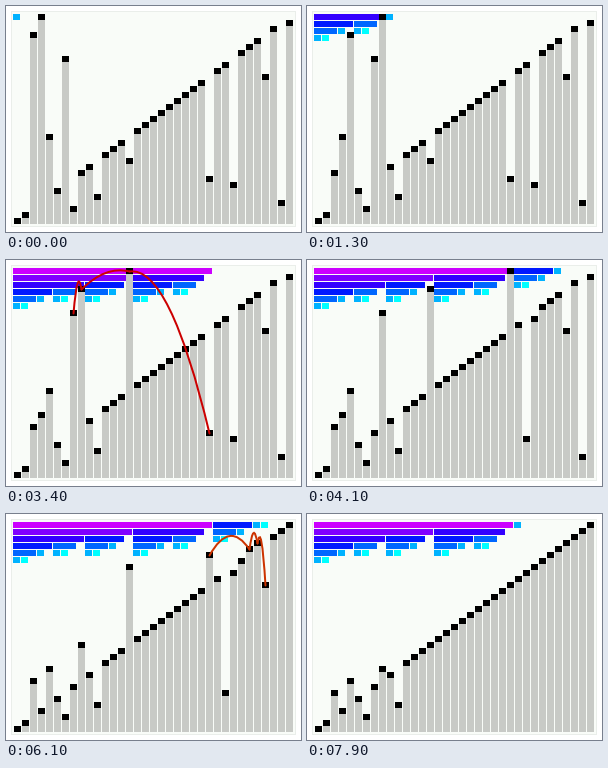
Write a matplotlib script that moves like this. It is 295x226 px and loops after 8000 ms.

```python
import colorsys

import matplotlib.pyplot as plt
from matplotlib.animation import FuncAnimation
from matplotlib.patches import PathPatch, Rectangle
from matplotlib.path import Path

W, H, DPI = 295, 226, 64
FRAMES, STEP_MS = 80, 100
LEONARDO = [1, 1, 3, 5, 9, 15, 25]
ORDER_COLORS = [colorsys.hsv_to_rgb(0.5 + 0.05 * k, 1, 1) for k in range(7)]
SIFT, TRINKLE = "#cc0000", "#cc3300"
BAR, PANEL, EDGE = "#c8cac6", "#f9fcf8", "#eaeeea"

START = [0, 1, 31, 34, 14, 5, 27, 2, 8, 9, 4, 11, 12, 13, 10, *range(15, 24),
         7, 25, 26, 6, 28, 29, 30, 24, 32, 3, 33]


def children(root, order):
    """Roots and orders of the two subtrees below a heap root."""
    if order < 2:
        return []
    return [(root - 1 - LEONARDO[order - 2], order - 1), (root - 1, order - 2)]


def trinkle(values, heaps, i, use_previous=True):
    """Hops (from, to, color) that the root of heap i has to make."""
    ends, total = [], -1
    for order in heaps:
        total += LEONARDO[order]
        ends.append(total)
    root, order = ends[i], heaps[i]
    x, hops = values[root], []
    while use_previous and i > 0:
        prev = ends[i - 1]
        if values[prev] <= max([x] + [values[c] for c, _ in children(root, order)]):
            break
        hops.append((root, prev, TRINKLE))
        i -= 1
        root, order = prev, heaps[i]
    while order > 1:
        child, child_order = max(children(root, order), key=lambda c: values[c[0]])
        if values[child] <= x:
            break
        hops.append((root, child, SIFT))
        root, order = child, child_order
    return hops


def grow(heaps):
    if len(heaps) > 1 and heaps[-2] == heaps[-1] + 1:
        return heaps[:-2] + [heaps[-2] + 1]
    return heaps + [0 if heaps and heaps[-1] == 1 else 1]


def smoothsort(values):
    """List of (values, heaps, hops), one entry per animation step."""
    values, steps, heaps, final = list(values), [], [], []
    for _ in values:
        final = grow(final)

    def show(hops=()):
        steps.append((list(values), list(heaps), list(hops)))

    def move(hops):
        for k in range(len(hops)):
            show(hops[:k + 1])
        for a, b, _ in hops:
            values[a], values[b] = values[b], values[a]

    for _ in range(len(values)):
        heaps = grow(heaps)
        show()
        settled = heaps == final[:len(heaps)]
        move(trinkle(values, heaps, len(heaps) - 1, settled))
    show()

    while heaps:
        order = heaps[-1]
        if order < 2:
            heaps = heaps[:-1]
        else:
            split = heaps[:-1] + [order - 1, order - 2]
            move(trinkle(values, split, len(split) - 2))
            heaps = split
            show()
            move(trinkle(values, heaps, len(heaps) - 1))
        show()
    return steps


STEPS = smoothsort(START)[:FRAMES]

fig = plt.figure(figsize=(W / DPI, H / DPI), dpi=DPI, facecolor="white")
ax = fig.add_axes([0, 0, 1, 1])
ax.set_xlim(0, W)
ax.set_ylim(H, 0)
ax.axis("off")


def rect(x, y, w, h, color):
    return ax.add_patch(Rectangle((x, y), w, h, fc=color, lw=0, antialiased=False))


rect(5, 5, 285, 216, EDGE)
rect(6, 6, 283, 214, PANEL)
drawn = []


def draw_tree(root, order, row):
    size = LEONARDO[order]
    x = 7 + 8 * (root - size + 1)
    drawn.append(rect(x, 8 + 7 * row, 8 * size - 1, 6, ORDER_COLORS[order]))
    for child, child_order in children(root, order):
        draw_tree(child, child_order, row + 1)


def draw_hop(values, a, b, color):
    (xa, ya), (xb, yb) = [(11.5 + 8 * i, 215.5 - 6 * values[i]) for i in (a, b)]
    curve = Path([(xa, ya), ((xa + xb) / 2, 5.5), (xb, yb)],
                 [Path.MOVETO, Path.CURVE3, Path.CURVE3])
    drawn.append(ax.add_patch(PathPatch(curve, fc="none", ec=color,
                                        lw=2 * 72 / DPI, capstyle="round")))


def update(n):
    while drawn:
        drawn.pop().remove()
    values, heaps, hops = STEPS[n]
    root = -1
    for order in heaps:
        root += LEONARDO[order]
        draw_tree(root, order, 0)
    for i, v in enumerate(values):
        x, top = 8 + 8 * i, 212 - 6 * v
        drawn.append(rect(x, top + 6, 7, 6 * v, BAR))
        drawn.append(rect(x, top, 7, 6, "black"))
    for hop in hops:
        draw_hop(values, *hop)
    return drawn


anim = FuncAnimation(fig, update, frames=FRAMES, interval=STEP_MS,
                     init_func=lambda: update(0), repeat=True, repeat_delay=0)
plt.show()
```
